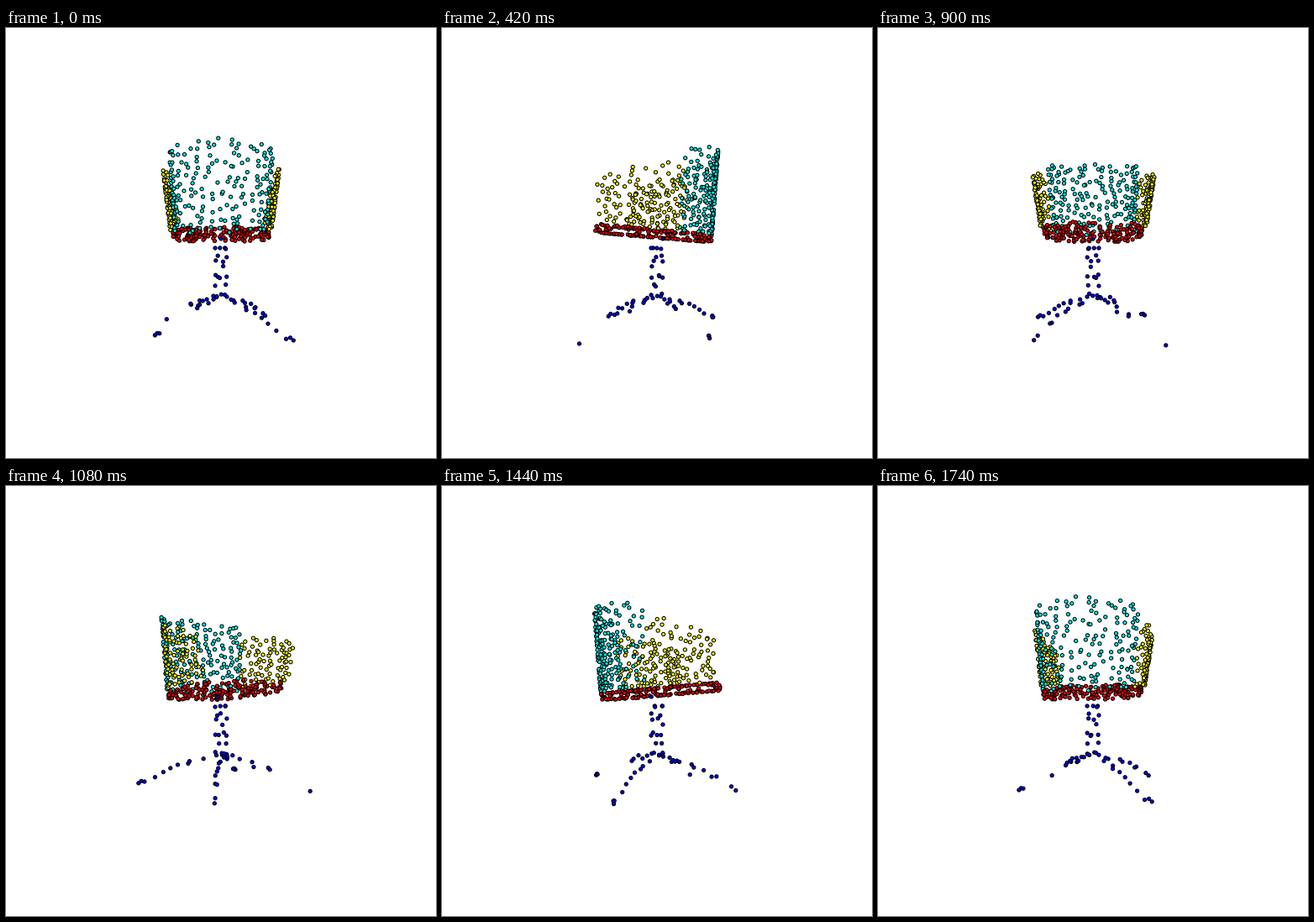
Write a matplotlib script that moves like this. It is 512 px wide and 512 px high and loops after 1.8 s.

```python
import numpy as np
import matplotlib.pyplot as plt
from matplotlib.animation import FuncAnimation

SIZE, DPI = 512, 100
FRAMES, INTERVAL = 30, 60
MID = SIZE / 2
CAMERA = 500  # camera distance in stage pixels

rng = np.random.default_rng(12)


def spread(n, jitter=0.5):
    """Even but irregular points in the unit square."""
    i = np.arange(1, n + 1)
    u = i * 0.7548777 + rng.normal(0, jitter / np.sqrt(n) / 2, n)
    v = i * 0.5698403 + rng.normal(0, jitter / np.sqrt(n) / 2, n)
    return u % 1, v % 1


def along(t, x, z):
    """Points at the shares t of a curve's length."""
    s = np.r_[0, np.cumsum(np.hypot(np.diff(x), np.diff(z)))]
    s /= s[-1]
    return np.interp(t, s, x), np.interp(t, s, z)


def rounded(phi, half_x, half_z, power):
    sx, cz = np.sin(phi), np.cos(phi)
    return (half_x * np.sign(sx) * np.abs(sx) ** power,
            half_z * np.sign(cz) * np.abs(cz) ** power)


def seat_top(z):
    return 15 - 0.1 * z


def seat_bottom(z):
    return 6.5 - 0.085 * z


def backrest(n):
    u, v = spread(n)
    x, z = along(u, *rounded(np.radians(np.linspace(-75, 75, 400)), 59, 72, 0.6))
    low = seat_top(z) + 2
    high = 108 - 10 * (2 * u - 1) ** 2
    flare = 0.9 + 0.1 * v
    return np.c_[x * flare, low + (high - low) * v, z * flare]


def armrest(n, side, front):
    u, v = spread(n)
    x, z = along(u, np.array([60, 67, 69, 68, 63]),
                 np.array([35, 18, 0, front + 18, front]))
    low = seat_top(z) + 1
    high = np.interp(z, [front, front + 12, 20, 35], [66, 73, 87, 90])
    return np.c_[side * x * (0.87 + 0.13 * v), low + (high - low) * v, z]


def seat(n_face, n_rim):
    parts = []
    for height in (seat_top, seat_bottom):
        u, v = spread(n_face)
        x, z = rounded(2 * np.pi * u, 56, 69, 0.75)
        r = np.sqrt(v)
        x, z = x * r, z * r - 4
        parts.append(np.c_[x, height(z), z])
    u, v = spread(n_rim)
    x, z = along(u, *rounded(np.linspace(0, 2 * np.pi, 400), 56, 69, 0.75))
    z = z - 4
    low = seat_bottom(z)
    parts.append(np.c_[x, low + (seat_top(z) - low) * v, z])
    return np.vstack(parts)


def column():
    h = np.array([5, -6, -6, -7, -6, -15, -17, -21, -22, -28, -38, -40, -41,
                  -41, -50, -51, -61, -62, -63, -64, -65])
    a = np.arange(len(h)) * 2.4
    return np.c_[7 * np.sin(a), h, 7 * np.cos(a)]


def leg(angle, radii):
    r = np.array(radii, float)
    a = np.radians(angle)
    side = rng.normal(0, 1.5, len(r))
    h = -64 - 0.15 * r - 0.0023 * r ** 2 + rng.normal(0, 1.5, len(r))
    return np.c_[r * np.sin(a) + side * np.cos(a), h,
                 r * np.cos(a) - side * np.sin(a)]


parts = [
    ("cyan", backrest(185)),
    ("yellow", armrest(82, -1, -57)),
    ("yellow", armrest(78, 1, -47)),
    ("red", seat(52, 56)),
    ("blue", column()),
    ("blue", leg(45, [21, 38, 40, 53, 62, 71, 81, 95, 98, 101])),
    ("blue", leg(140, [20, 23, 43, 46, 58, 67, 72, 89, 94])),
    ("blue", leg(224, [14, 22, 37, 39, 56, 58, 104])),
    ("blue", leg(312, [13, 20, 27, 34, 36, 88, 90, 92])),
]
cloud = np.vstack([p for _, p in parts])
colors = np.repeat([c for c, _ in parts], [len(p) for _, p in parts])


def project(turn):
    x, h, z = cloud.T
    c, s = np.cos(turn), np.sin(turn)
    depth = z * c - x * s
    scale = CAMERA / (CAMERA - depth)
    order = np.argsort(depth)
    pos = np.c_[MID + (x * c + z * s) * scale, MID - h * scale]
    return pos[order], colors[order]


fig = plt.figure(figsize=(SIZE / DPI, SIZE / DPI), dpi=DPI, facecolor="white")
ax = fig.add_axes([0, 0, 1, 1])
ax.set(xlim=(0, SIZE), ylim=(SIZE, 0))
ax.axis("off")
dots = ax.scatter(cloud[:, 0], cloud[:, 1], s=9, c=colors,
                  edgecolors="black", linewidths=0.75)


def update(i):
    pos, fill = project(2 * np.pi * i / FRAMES)
    dots.set_offsets(pos)
    dots.set_facecolor(fill)
    return dots,


anim = FuncAnimation(fig, update, frames=FRAMES, interval=INTERVAL,
                     init_func=lambda: update(0), repeat=True, repeat_delay=0)
plt.show()
```
